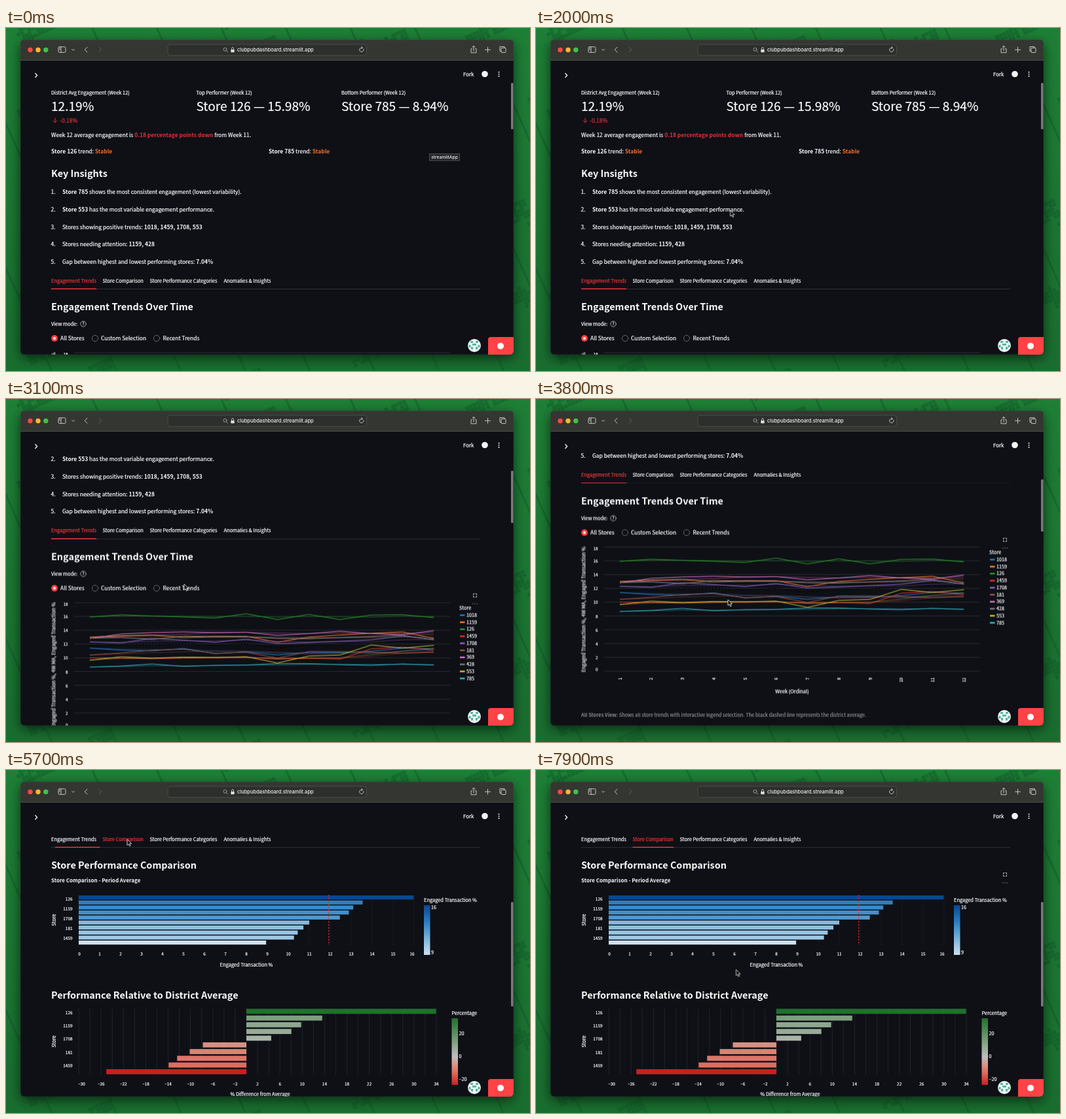
Recreate the animation shown at these times as an HTML page. Size 800 by 525 pixels, loop 8 s.

```html
<!DOCTYPE html>
<html lang="en">
<head>
<meta charset="utf-8">
<title>Store dashboard</title>
<style>
html, body { margin: 0; width: 100%; height: 100%; overflow: hidden; background: #1b7430; }
svg { display: block; width: 800px; height: 525px; }
text {
  font: 8.48px "Noto Sans CJK JP", "Noto Sans CJK SC", "Noto Sans CJK KR", "Noto Sans", sans-serif;
  color: #fafafa; fill: currentColor; stroke: currentColor; stroke-width: .22; white-space: pre;
}
.small { font-size: 7.44px; }
.tick { font-size: 6.4px; }
.legend { font-size: 7.2px; }
.big { font-size: 19.1px; }
.h3 { font-size: 14.42px; }
.b, .h3 { font-weight: 700; stroke-width: 0; }
.red { color: #e03136; }
.orange { color: #f26c2c; }
.grey text { color: #8c8d92; }
.ui { font: 500 7.5px Inter, "Liberation Sans", sans-serif; color: #f0f0f0; stroke-width: 0; }
.icon { fill: none; stroke: #c4c5c3; stroke-width: 1; stroke-linecap: round; stroke-linejoin: round; }
.shadow { filter: drop-shadow(0 5px 9px #0009); }

#scroll, #thumb, #line, #cursor, .cut { animation: 8s linear infinite; }
#scroll { animation-name: scroll; }
#thumb { animation-name: thumb; }
#line { animation-name: line; }
#cursor { animation-name: move; }
.cut { animation-timing-function: step-end; }
#tip { animation-name: tip; }
#pointer { animation-name: pointer; }
#beam { animation-name: beam; }
#trends { animation-name: before; }
#compare { animation-name: after; }
#trendTools { animation-name: trendTools; }
#compareTools { animation-name: compareTools; }
#tab1 { animation-name: tab1; }
#tab2 { animation-name: tab2; }

@keyframes scroll {
  0%, 27.5% { transform: translateY(0); }
  30% { transform: translateY(-19px); }
  35% { transform: translateY(-115px); }
  41.25% { transform: translateY(-232px); }
  45% { transform: translateY(-268px); }
  47.5% { transform: translateY(-270.5px); }
  52.5%, 100% { transform: translateY(-281px); }
}
@keyframes thumb {
  0%, 27.5% { y: 84px; height: 71px; }
  30% { y: 84px; height: 74px; }
  35% { y: 99px; height: 80px; }
  41.25% { y: 117px; height: 80px; }
  47.5% { y: 123px; height: 80px; }
  52.5%, 70.6% { y: 125px; height: 80px; }
  70.61%, 100% { y: 202px; height: 160px; }
}
@keyframes line {
  0%, 71% { x: 69px; width: 69px; }
  74.4%, 100% { x: 147.5px; width: 62.5px; }
}
@keyframes move {
  0%, 3.75% { transform: translate(650px, 188px); animation-timing-function: ease-in-out; }
  15%, 17.5% { transform: translate(478px, 265px); animation-timing-function: ease-in-out; }
  27.5%, 37.5% { transform: translate(270px, 281px); animation-timing-function: ease-in-out; }
  43.75%, 48.75% { transform: translate(293px, 307px); animation-timing-function: ease-in-out; }
  53.75%, 57.5% { transform: translate(259px, 275.5px); animation-timing-function: ease-in-out; }
  66.25%, 73.75% { transform: translate(185px, 106px); animation-timing-function: ease-in-out; }
  82.5%, 100% { transform: translate(305.5px, 305.5px); }
}
@keyframes tip { 0% { opacity: 1; } 3.75%, 100% { opacity: 0; } }
@keyframes pointer { 0% { opacity: 0; } 3.75% { opacity: 1; } 26% { opacity: 0; } 32.5%, 100% { opacity: 1; } }
@keyframes beam { 0% { opacity: 0; } 26% { opacity: 1; } 32.5%, 100% { opacity: 0; } }
@keyframes before { 0% { opacity: 1; } 70.6%, 100% { opacity: 0; } }
@keyframes after { 0% { opacity: 0; } 70.6%, 100% { opacity: 1; } }
@keyframes trendTools { 0% { opacity: 0; } 38.75% { opacity: 1; } 61.25%, 100% { opacity: 0; } }
@keyframes compareTools { 0% { opacity: 0; } 77.5%, 100% { opacity: 1; } }
@keyframes tab1 { 0% { color: #ec363a; } 70.6%, 100% { color: #fafafa; } }
@keyframes tab2 { 0% { color: #fafafa; } 66.25%, 100% { color: #ec363a; } }
</style>
</head>
<body>
<svg viewBox="0 0 800 525" xmlns="http://www.w3.org/2000/svg">
  <defs>
    <linearGradient id="green" x1="0" y1="0" x2="0" y2="1">
      <stop offset="0" stop-color="#1e7f36"/><stop offset="1" stop-color="#196d2f"/>
    </linearGradient>
    <linearGradient id="blues" x1="0" y1="1" x2="0" y2="0"></linearGradient>
    <linearGradient id="spread" x1="0" y1="1" x2="0" y2="0"></linearGradient>
    <clipPath id="window"><rect x="22" y="18" width="753" height="482" rx="6"/></clipPath>
    <clipPath id="view"><rect x="22" y="83" width="753" height="417"/></clipPath>
    <g id="tools">
      <path d="M-2.5-1v-1.5h1.5M1-2.5h1.5V-1M2.5 1v1.5H1M-1 2.5h-1.5V1" class="icon"/>
      <path d="M-4 12.7h8" fill="none" stroke="#777" stroke-width="1.2" stroke-dasharray="1.4 1.9"/>
    </g>
  </defs>

  <rect width="800" height="525" fill="url(#green)"/>
  <path id="cells" fill="#0f5726" opacity=".45" transform="rotate(-24 400 262)"/>
  <rect class="shadow" x="22" y="18" width="753" height="482" rx="6" fill="#0e1016"/>

  <g clip-path="url(#window)">
    <rect x="22" y="18" width="753" height="32" fill="#343632"/>
    <rect x="22" y="49" width="753" height="1" fill="#4a4c49"/>
    <circle cx="37" cy="33.5" r="3.7" fill="#fb4a41"/>
    <circle cx="49" cy="33.5" r="3.7" fill="#f9b82e"/>
    <circle cx="60.8" cy="33.5" r="3.7" fill="#3fc24a"/>
    <g class="icon">
      <rect x="80" y="28.8" width="11" height="8.6" rx="1.6"/>
      <path d="M84 29v8M81.5 31h1M81.5 33h1M100.8 32.5l1.8 1.8 1.8-1.8M124 29.3l-3.8 3.9 3.8 3.9"/>
      <path d="M142 29.3l3.8 3.9-3.8 3.9" stroke="#60625f"/>
      <rect x="247" y="25" width="303.5" height="17" rx="4" style="fill:#2d2f2c;stroke:#4a4c49"/>
      <circle cx="334.5" cy="32.8" r="2.5" style="stroke:#999"/><path d="M336.5 34.8l2.2 2.2" style="stroke:#999"/>
      <path d="M344.5 33v-1.5a1.5 1.7 0 0 1 3 0V33"/>
      <path d="M546 32.5a3.2 3.2 0 1 1-2-2.2M543 28.5l1.5 1.8-2 1.2"/>
      <path d="M711.5 31.8H710v6h8v-6h-1.5M714 35v-7.5M712 29.3l2-2 2 2M735.5 29.3v8M731.5 33.3h8"/>
      <path d="M755.5 35.5h-1.5v-7h7v1.5"/><rect x="756" y="30.5" width="7" height="7" rx="1"/>
    </g>
    <rect x="343.3" y="33" width="5.4" height="4.2" rx=".8" fill="#ddd"/>
    <text class="ui" x="353" y="36.4">clubpubdashboard.streamlit.app</text>

    <path class="icon" d="M44.8 69.5l2.8 3-2.8 3" style="stroke:#eee;stroke-width:1.4"/>
    <text x="698" y="73.5" style="font-size:7.8px">Fork</text>
    <circle cx="731" cy="70.5" r="4.8" fill="#f4f4f4"/>
    <path d="M752.5 66.8v9" fill="none" stroke="#eee" stroke-width="1.8" stroke-dasharray="1.7 1.4"/>

    <g clip-path="url(#view)">
      <g id="scroll">
        <text class="small" x="69" y="101.7">District Avg Engagement (Week 12)</text>
        <text class="small" x="290.5" y="101.7">Top Performer (Week 12)</text>
        <text class="small" x="512" y="101.7">Bottom Performer (Week 12)</text>
        <text class="big" x="69" y="126.5">12.19%</text>
        <text class="big" x="290.5" y="126.5">Store 126 — 15.98%</text>
        <text class="big" x="512" y="126.5">Store 785 — 8.94%</text>
        <path class="icon" d="M75 138v6.5M72 141.8l3 3 3-3" style="stroke:#e03136"/>
        <text class="red" x="82" y="144.8">-0.18%</text>
        <text x="69" y="167">Week 12 average engagement is <tspan class="b red">0.18 percentage points down</tspan> from Week 11.</text>
        <text x="69" y="191.5"><tspan class="b">Store 126</tspan> trend: <tspan class="b orange">Stable</tspan></text>
        <text x="401" y="191.5"><tspan class="b">Store 785</tspan> trend: <tspan class="b orange">Stable</tspan></text>
        <text class="h3" x="69" y="227.5">Key Insights</text>
        <text x="68.5" y="254">1.</text>
        <text x="86" y="254"><tspan class="b">Store 785</tspan> shows the most consistent engagement (lowest variability).</text>
        <text x="68.5" y="280.8">2.</text>
        <text x="86" y="280.8"><tspan class="b">Store 553</tspan> has the most variable engagement performance.</text>
        <text x="68.5" y="307.5">3.</text>
        <text x="86" y="307.5">Stores showing positive trends: <tspan class="b">1018, 1459, 1708, 553</tspan></text>
        <text x="68.5" y="334">4.</text>
        <text x="86" y="334">Stores needing attention: <tspan class="b">1159, 428</tspan></text>
        <text x="68.5" y="360.5">5.</text>
        <text x="86" y="360.5">Gap between highest and lowest performing stores: <tspan class="b">7.04%</tspan></text>

        <g transform="translate(0 281)">
          <text id="tab1" class="small cut" x="69" y="108.7">Engagement Trends</text>
          <text id="tab2" class="small cut" x="147.5" y="108.7">Store Comparison</text>
          <text class="small" x="219.5" y="108.7">Store Performance Categories</text>
          <text class="small" x="332.5" y="108.7">Anomalies &amp; Insights</text>
          <rect x="69" y="118.2" width="655" height=".8" fill="#34363d"/>
          <rect id="line" x="69" y="117.6" width="69" height="1.4" fill="#f5393d"/>

          <g id="trends" class="cut">
            <text class="h3" x="69" y="150.8">Engagement Trends Over Time</text>
            <text class="small" x="69" y="174.7">View mode:</text>
            <circle class="icon" cx="118" cy="172" r="4.2" style="stroke-width:.8"/>
            <text class="tick" x="118" y="174.4" text-anchor="middle">?</text>
            <circle cx="74" cy="194" r="4.9" fill="#ff4448"/><circle cx="74" cy="194" r="1.9" fill="#fff"/>
            <circle class="icon" cx="136" cy="194" r="4.6" style="stroke:#66686e"/>
            <circle class="icon" cx="230" cy="194" r="4.6" style="stroke:#66686e"/>
            <text x="83" y="197">All Stores</text>
            <text x="145" y="197">Custom Selection</text>
            <text x="239.5" y="197">Recent Trends</text>
            <g id="lines"></g>
            <g class="grey"><text class="small" x="69" y="476"><tspan class="b">All Stores View:</tspan> Shows all store trends with interactive legend selection. The black dashed line represents the district average.</text></g>
            <g id="trendTools" class="cut"><use href="#tools" x="716" y="205"/></g>
          </g>

          <g id="compare" class="cut">
            <text class="h3" x="69" y="151">Store Performance Comparison</text>
            <text class="b" x="69" y="172.3" style="font-size:8px">Store Comparison - Period Average</text>
            <g id="bars"></g>
            <text class="h3" x="69" y="349.5">Performance Relative to District Average</text>
            <g id="gaps"></g>
            <g id="compareTools" class="cut"><use href="#tools" x="716" y="160"/></g>
          </g>
        </g>
      </g>
    </g>

    <rect id="thumb" x="771" y="84" width="3.6" height="71" rx="1.5" fill="#77797e"/>
    <circle cx="715" cy="486" r="10" fill="#f3f6f5"/>
    <path d="M709 479h4v3h-4zM717 479h4v3h-4zM712 483h6v3h-6zM706.5 485h3v4h-3zM720.5 485h3v4h-3zM710 488h3v4h-3zM717 488h3v4h-3z" fill="#55b8a4"/>
    <path d="M736 500v-23a4 4 0 0 1 4-4h35v27z" fill="#ff4245"/>
    <circle cx="755" cy="486.8" r="5" fill="#fff"/>
  </g>
  <rect x="22.3" y="18.3" width="752.4" height="481.4" rx="6" fill="none" stroke="#777" stroke-opacity=".25" stroke-width=".6"/>

  <g id="tip" class="cut">
    <rect x="646.5" y="192.5" width="46" height="10.5" fill="#25262a" stroke="#606165" stroke-width=".7"/>
    <text class="ui" x="669.5" y="200.2" text-anchor="middle" style="font-size:6.7px">streamlitApp</text>
  </g>
  <g id="cursor">
    <path id="pointer" class="cut" d="M0 0v9.2l2.1-1.9 1.5 3.3 1.6-.7-1.5-3.2h2.8z" fill="#080808" stroke="#f4f4f4" stroke-width=".8"/>
    <path id="beam" class="cut" d="M-2.5-5q2.5 0 2.5 1.5Q0-5 2.5-5M0-4V4M-2.5 5q2.5 0 2.5-1.5Q0 5 2.5 5M-1.3 1.5h2.6" fill="none" stroke="#ddd" stroke-width=".9"/>
  </g>
</svg>

<script>
const $ = id => document.getElementById(id);

function add(parent, tag, attrs, text) {
  const node = document.createElementNS('http://www.w3.org/2000/svg', tag);
  for (const key in attrs) node.setAttribute(key, attrs[key]);
  if (text !== undefined) node.textContent = text;
  parent.append(node);
  return node;
}

// Places a label by its vertical centre.
function label(parent, x, y, text, cls = 'tick', anchor = 'middle', turned = false) {
  const attrs = { x, y: y + 2.5, class: cls, 'text-anchor': anchor };
  if (turned) attrs.transform = `rotate(-90 ${x} ${y})`;
  add(parent, 'text', attrs, text);
}

const rule = (g, x1, y1, x2, y2, stroke = '#393b42') =>
  add(g, 'line', { x1, y1, x2, y2, stroke, 'stroke-width': .7 });

const mean = list => list.reduce((a, b) => a + b, 0) / list.length;

// Colour ramps: [value, r, g, b] stops.
const blues = [[9, 204, 224, 241], [11, 132, 186, 220], [13.5, 46, 128, 194], [16, 8, 72, 145]];
const spread = [[-25, 198, 32, 34], [-14, 222, 108, 94], [-7, 218, 148, 134], [0, 190, 190, 190], [13, 127, 160, 127], [34, 32, 112, 44]];

function shade(ramp, value) {
  const v = Math.max(ramp[0][0], Math.min(ramp.at(-1)[0], value));
  const i = Math.max(1, ramp.findIndex(stop => stop[0] >= v));
  const [a, b] = [ramp[i - 1], ramp[i]];
  const k = (v - a[0]) / (b[0] - a[0]);
  return `rgb(${[1, 2, 3].map(n => Math.round(a[n] + (b[n] - a[n]) * k))})`;
}

function fillGradient(id, ramp) {
  const low = ramp[0][0], span = ramp.at(-1)[0] - low;
  for (const [v] of ramp) add($(id), 'stop', { offset: (v - low) / span, 'stop-color': shade(ramp, v) });
}

function drawCells() {
  let seed = 11, d = '';
  const rnd = () => (seed = (seed * 16807) % 2147483647) / 2147483647;
  for (let band = 0; band < 120; band++) {
    const x = -100 + 6 * Math.floor(rnd() * 165), y = -180 + 6 * Math.floor(rnd() * 150);
    const cols = 2 + rnd() * 11, rows = 1 + rnd() * 4;
    for (let i = 0; i < cols; i++)
      for (let j = 0; j < rows; j++)
        if (rnd() < .8) d += `M${x + i * 6} ${y + j * 6}h5.3v5.3h-5.3z`;
  }
  for (let i = 0; i < 12; i++) d += `M${-100 + i * 90} -200h3v950h-3z`;
  $('cells').setAttribute('d', d);
}

const stores = [
  ['1018', '#2b7cc9', [11.4, 11.1, 11, 11.35, 10.6, 10.85, 10.4, 10.8, 10.75, 10.95, 11.4, 11.3]],
  ['1159', '#ff7f32', [13, 13.2, 13.3, 12.95, 13.1, 13.1, 12.25, 13, 13.3, 13.55, 13.75, 12.8]],
  ['126', '#2ca02c', [15.92, 16.22, 16.06, 15.92, 15.75, 16.39, 15.54, 16.29, 15.54, 16.2, 16.25, 15.82]],
  ['1459', '#e8352e', [10, 9.95, 9.85, 10, 10, 10.1, 9.8, 9.95, 9.8, 11.3, 11.55, 11.1]],
  ['1708', '#9467cd', [12.3, 12.15, 12.8, 12.55, 12.25, 12.7, 12.05, 12.2, 12.4, 12.6, 13.15, 12.65]],
  ['181', '#a2564a', [10.4, 10.7, 11.1, 11.25, 10.65, 10.8, 9.95, 10.9, 10.9, 10.8, 10.65, 10.8]],
  ['369', '#e377d0', [12.8, 13.45, 13.65, 13.75, 13.65, 13.7, 13.25, 13.5, 13.85, 13.5, 13.35, 13.93]],
  ['428', '#808080', [12.85, 12.95, 12.65, 13.15, 13.05, 13.05, 12.8, 12.75, 12.95, 13.1, 13.25, 12.6]],
  ['553', '#c9c934', [9.65, 10.15, 9.95, 10.1, 10.05, 10.15, 9.25, 10.25, 10.4, 11.85, 11.4, 11.8]],
  ['785', '#35bfd0', [8.65, 8.8, 9.1, 8.75, 8.9, 8.95, 9.15, 9.15, 9, 8.9, 9.1, 8.95]]
];

function drawLines() {
  const g = $('lines');
  const X = week => 128 + week * 47.75;
  const Y = value => 406 - value * 10.556;
  const plot = (list, stroke, more) => add(g, 'polyline', {
    points: list.map((v, i) => `${X(i)},${Y(v).toFixed(2)}`).join(' '),
    fill: 'none', stroke, 'stroke-width': 1, ...more
  });

  for (let v = 0; v <= 18; v += 2) {
    rule(g, 104, Y(v), 678, Y(v));
    label(g, 94.5, Y(v) + (v === 18 ? 3 : v === 0 ? -3 : .5), v, 'tick', 'end');
  }
  for (let w = 0; w < 12; w++) label(g, X(w), 416, w + 1, 'tick', 'end', true);
  label(g, 391, 437, 'Week (Ordinal)', 'small');
  label(g, 73, 311.5, 'Engaged Transaction %, 4W MA, Engaged Transaction %', 'small', 'middle', true);

  plot(stores[0][2].map((_, i) => mean(stores.map(s => s[2][i]))), '#000', { 'stroke-dasharray': '3 2' });
  for (const [, color, data] of stores) {
    const rolling = data.map((_, i) => mean(data.slice(Math.max(0, i - 3), i + 1)));
    plot(rolling, color, { 'stroke-dasharray': '1.2 1.2', opacity: .85 });
    plot(data, color);
  }

  label(g, 692, 224, 'Store', 'small', 'start');
  stores.forEach(([name, color], i) => {
    const y = 235.3 + i * 10.75;
    add(g, 'rect', { x: 693, y: y - 1.2, width: 7.5, height: 2.4, fill: color });
    label(g, 703, y, name, 'legend', 'start');
  });
}

const averages = [15.98, 13.55, 13.1, 12.89, 12.46, 11, 10.72, 10.45, 10.27, 8.94];
const district = 11.93;
const named = ['126', '1159', '1708', '181', '1459'];

function drawBars() {
  const g = $('bars');
  const X = v => 111 + v * 32;
  for (let v = 0; v <= 16; v++) {
    rule(g, X(v), 192, X(v), 268, '#1d1f26');
    label(g, X(v) + (v === 0 ? 1 : v === 16 ? -3 : 0), 281, v);
  }
  averages.forEach((v, i) => add(g, 'rect', {
    x: 111, y: 192 + i * 7.67, width: v * 32, height: 6.2, fill: shade(blues, v)
  }));
  add(g, 'line', { x1: X(district), x2: X(district), y1: 191, y2: 268, stroke: '#e02a2a', 'stroke-width': 1.2, 'stroke-dasharray': '2.5 2' });
  named.forEach((name, i) => label(g, 101.5, 197.5 + i * 14.9, name, 'tick', 'end'));
  label(g, 73, 229.5, 'Store', 'small', 'middle', true);
  label(g, 367, 298, 'Engaged Transaction %', 'small');
  label(g, 638, 199, 'Engaged Transaction %', 'small', 'start');
  add(g, 'rect', { x: 638, y: 207, width: 9.5, height: 76, fill: 'url(#blues)' });
  label(g, 649, 210.5, 16, 'legend', 'start');
  label(g, 649, 279, 9, 'legend', 'start');
}

function drawGaps() {
  const g = $('gaps');
  const X = v => 367 + v * 8.53;
  for (let v = -30; v <= 34; v += 2) {
    rule(g, X(v), 365, X(v), 466, '#292b31');
    if ((v + 30) % 4 === 0)
      label(g, X(v) + (v === -30 ? 4.5 : 0), 480, String(v).replace('-', '−'));
  }
  averages.forEach((v, i) => {
    const gap = (v / district - 1) * 100;
    add(g, 'rect', {
      x: Math.min(X(0), X(gap)), y: 365.5 + i * 10.27,
      width: Math.abs(gap) * 8.53, height: 7.8, fill: shade(spread, gap)
    });
  });
  named.forEach((name, i) => label(g, 101.5, 371.5 + i * 20.2, name, 'tick', 'end'));
  label(g, 73, 415.5, 'Store', 'small', 'middle', true);
  label(g, 388, 496.5, '% Difference from Average', 'small');
  label(g, 680.5, 372, 'Percentage', 'small', 'start');
  add(g, 'rect', { x: 680.5, y: 380, width: 9.5, height: 102, fill: 'url(#spread)' });
  for (const v of [20, 0, -20])
    label(g, 691.5, 438.5 - v * 1.73, String(v).replace('-', '−'), 'legend', 'start');
}

fillGradient('blues', blues);
fillGradient('spread', spread);
drawCells();
drawLines();
drawBars();
drawGaps();
</script>
</body>
</html>
```
